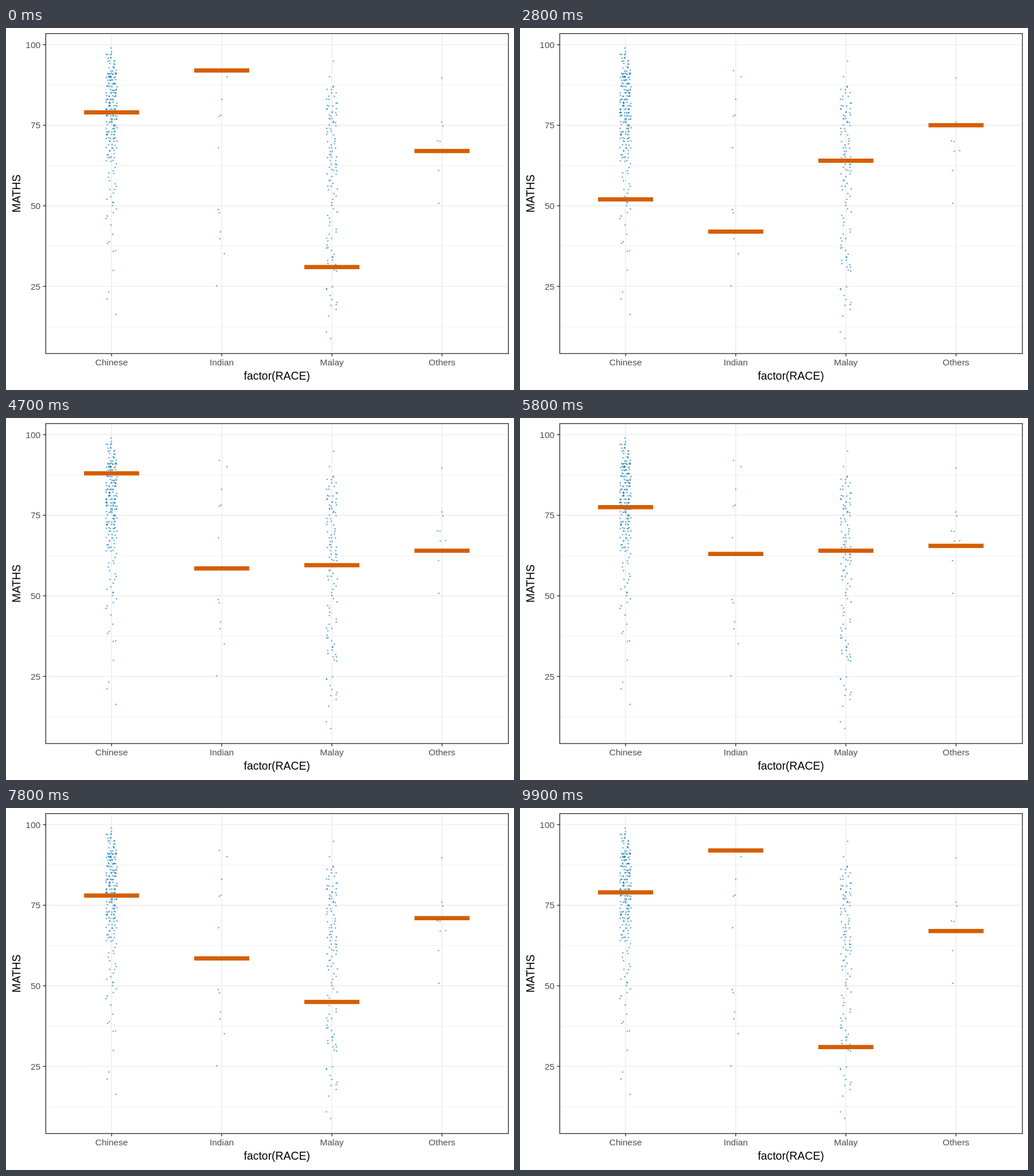
Animation, 885 px wide and 632 px high, one loop 10000 ms. Source, as an HTML page:

```html
<!DOCTYPE html>
<html lang="en">
<head>
<meta charset="utf-8">
<title>Maths scores by group</title>
<style>
  html, body { margin: 0; width: 100%; height: 100%; overflow: hidden; background: #fff; }
  svg { display: block; width: 885px; height: 632px; }
  text { font-family: "Liberation Sans", Arial, sans-serif; text-anchor: middle; }
  .label { font-size: 15.5px; fill: #4d4d4d; }
  .left { text-anchor: end; }
  .title { font-size: 19.4px; fill: #000; }
  .major { stroke: #ebebeb; stroke-width: 1.4; }
  .minor { stroke: #ebebeb; stroke-width: .75; }
  .tick { stroke: #333; stroke-width: 1.4; }
  .frame { fill: none; stroke: #333; stroke-width: 1.4; }
  .dot { fill: #0072b2; fill-opacity: .6; }
  .bar { fill: #d55e00; }
</style>
</head>
<body>
<svg id="plot" viewBox="0 0 885 632"></svg>
<script>
const plot = document.getElementById('plot');
const groups = ['Chinese', 'Indian', 'Malay', 'Others'];
const panel = { left: 69.3, top: 9.7, right: 875.3, bottom: 568.4 };
const colX = i => 183.9 + 191.9 * i;
const scoreY = v => 591.8 - 5.627 * v;

function add(tag, attrs, text) {
  const node = document.createElementNS('http://www.w3.org/2000/svg', tag);
  for (const key in attrs) node.setAttribute(key, attrs[key]);
  if (text) node.textContent = text;
  plot.appendChild(node);
  return node;
}
const line = (cls, x1, y1, x2, y2) => add('line', { class: cls, x1, y1, x2, y2 });
const across = (cls, v) => line(cls, panel.left, scoreY(v), panel.right, scoreY(v));
const dot = (cx, cy) => add('circle', { class: 'dot', cx, cy, r: 1.3 });

// Grid, axes and labels
[12.5, 37.5, 62.5, 87.5].forEach(v => across('minor', v));
[25, 50, 75, 100].forEach(v => {
  const y = scoreY(v);
  across('major', v);
  line('tick', panel.left - 4.9, y, panel.left, y);
  add('text', { class: 'label left', x: 60.2, y: y + 5.7 }, String(v));
});
groups.forEach((name, i) => {
  const x = colX(i);
  line('major', x, panel.top, x, panel.bottom);
  line('tick', x, panel.bottom, x, panel.bottom + 4.9);
  add('text', { class: 'label', x, y: 589 }, name);
});
add('text', { class: 'title', x: 472, y: 614 }, 'factor(RACE)');
add('text', { class: 'title', transform: 'translate(24.6 289) rotate(-90)' }, 'MATHS');

// Lone dots: offset from the column centre, then height on the stage
function lone(col, ...pts) {
  for (let k = 0; k < pts.length; k += 2) dot(colX(col) + pts[k], pts[k + 1]);
}
lone(0, -1, 35, 0, 41, -8, 473, -5, 461, 8, 500, 3, 423, 3, 390, 7, 389, -7, 376, -4, 373, 2, 360, -1, 344);
lone(1, -4, 74, 9.5, 85, 0, 124.5, -4, 154, -1, 152, -5.5, 209,
  -6, 317, -4, 322.5, -2, 356, -3, 368, 4.5, 394, -8.5, 450);
lone(2, 3, 58, -4, 85, -2, 542, -9.5, 530.5, -5.5, 503, 7.5, 491.5, -1.5, 484.5, 7.5, 483,
  9, 479, 0, 474, -3, 467, -9.5, 455, -9, 456.5, 1, 452);
lone(3, -.5, 87, -.5, 164, 1.5, 171, -8, 197, -3.5, 198, -3, 215, 6.5, 214, -6, 249, -5.5, 306);

// Crowded marks: whole scores spread along the deciles, then jittered
let seed = 20;
function jitter(size) {
  seed = (seed * 16807) % 2147483647;
  return (seed / 2147483647 * 2 - 1) * size;
}
function crowd(col, total, deciles) {
  for (let i = 0; i < total; i++) {
    const at = (i + .5) / total * 10;
    const d = Math.floor(at);
    const score = Math.round(deciles[d] + (deciles[d + 1] - deciles[d]) * (at - d));
    dot(colX(col) + jitter(9.6), scoreY(score + jitter(.22)));
  }
}
crowd(0, 212, [46, 63.5, 70, 73.5, 77.5, 80, 83, 86, 89.5, 91.5, 97.5]);
crowd(2, 105, [29.5, 35, 43, 54, 60.5, 64.5, 69, 75, 78.5, 82, 87.4]);

add('rect', {
  class: 'frame', x: panel.left, y: panel.top,
  width: panel.right - panel.left, height: panel.bottom - panel.top
});

// One random draw per group in each row
const draws = [
  [79, 92, 31, 67], [93, 48, 62, 70], [78, 49, 16, 75], [90, 78, 58, 61], [77, 40, 76, 90],
  [71, 78, 32, 70], [80, 48, 66, 70], [52, 42, 64, 75], [78, 35, 58, 90], [90, 78, 60, 67],
  [74, 68, 30, 70], [85, 49, 85, 61], [91, 68, 34, 67], [89, 78, 63, 75], [73, 48, 70, 61],
  [82, 78, 58, 70], [90, 25, 62, 70], [58, 68, 67, 70], [39, 40, 65, 90], [80, 25, 58, 67],
  [76, 92, 32, 75], [79, 78, 63, 51], [95, 90, 65, 75], [36, 68, 95, 70], [77, 49, 58, 70]
];
const bars = groups.map((_, i) =>
  add('rect', { class: 'bar', x: colX(i) - 48, width: 96, height: 7.4 }));

// Each draw holds for three ticks, then one tick sits halfway to the next;
// one tick is skipped at the middle of the loop.
function show(now) {
  const tick = Math.floor(now / 100) % 100;
  const step = tick < 50 ? tick : tick + 1;
  const k = Math.floor(step / 4) % draws.length;
  const next = draws[(k + 1) % draws.length];
  const mix = step % 4 === 3 ? .5 : 0;
  bars.forEach((bar, i) => {
    const v = draws[k][i] + (next[i] - draws[k][i]) * mix;
    bar.setAttribute('y', scoreY(v) - 3.7);
  });
}
function loop() {
  show(performance.now());
  requestAnimationFrame(loop);
}
loop();
</script>
</body>
</html>
```
